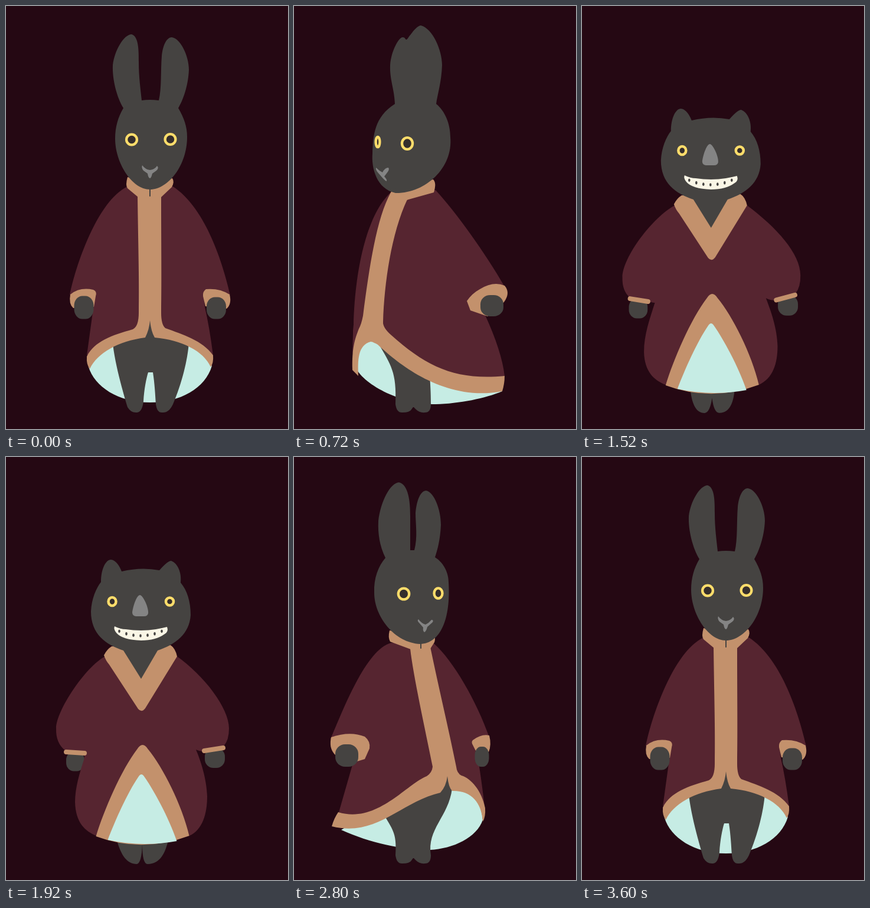
An HTML page with a canvas for the animation above (3680 ms loop, 478 px wide and 717 px high).

```html
<!DOCTYPE html>
<html lang="en">
<head>
<meta charset="utf-8">
<title>Turning dancers</title>
<style>
html, body { margin: 0; width: 478px; height: 717px; overflow: hidden; background: #250813; }
canvas { display: block; }
</style>
</head>
<body>
<canvas id="stage" width="478" height="717"></canvas>
<script>
const ctx = document.getElementById('stage').getContext('2d');
const LOOP = 3680, STEP = 80, TURN = 920;
const BG = '#250813', FUR = '#454341', COAT = '#562530', TRIM = '#c3916c', LINING = '#c6ece4',
      YELLOW = '#ffdd6b', PUPIL = '#352e2c', GREY = '#848484', TEETH = '#faf6e6';

// Poses hold path strings of equal structure; eyes and paws are "x,y rx ry".
const feet = '172,675 Q174,690 184,689 Q196,689 199,684 C200,682 201,681 202,680 L203,680 C204,681 205,682 207,684 Q213,690 222,689 Q232,689 232,675 ';

const front = {
  lining: 'M140,612 C150,645 190,672 244,672 C295,672 338,648 349,610 Q244,470 140,612Z',
  legs: 'M180,560 C182,600 200,660 206,680 Q212,690 222,689 Q231,688 233,670 C234,650 238,630 241,621 L249,621 C252,640 253,660 254,675 Q256,690 265,689 Q276,690 283,675 C298,640 308,600 310,570 L244,520Z',
  body: 'M206,306 C155,330 118,440 108,490 L150,490 L148,512 L137,592 Q180,560 225,545 L244,530 L263,545 Q310,560 351,592 Q345,545 337,510 L335,490 L380,490 C365,425 335,340 283,306Z',
  trim: 'M223,322 C224,400 226,460 225,520 Q225,543 215,548 C180,558 150,568 137,594 Q136,608 142,615 C155,588 190,568 236,562 Q243,548 244,533 Q246,552 252,562 C298,566 335,585 347,612 Q352,605 351,592 C333,567 300,557 270,546 Q263,540 263,520 C264,460 263,400 263,322Z',
  cuffL: 'M109,489 Q125,476 148,481 Q155,484 152,492 L149,510 L114,512 Q106,505 109,489Z',
  cuffR: 'M379,489 Q362,478 339,480 Q333,484 334,492 L338,509 L374,513 Q383,505 379,489Z',
  handL: '132,511 16.5 19.5',
  handR: '356.5,512 16.5 18.5',
  collar: 'M206,290 Q202,304 206,309 L224,324 L263,324 L281,307 Q286,298 282,292 L244,300Z',
  notch: 'M244,305 L244,322',
  head: 'M230,160 Q243,158 259,160 C264,140 262,110 264,85 C266,65 273,53 281,53 C296,55 310,85 310,108 C309,135 300,160 292,173 C302,190 307,205 307,222 C307,270 275,311 244,311 C213,311 185,265 185,225 C185,205 190,188 199,173 C188,155 180,125 181,100 C184,75 200,48 213,48 C225,52 225,75 225,95 C225,120 228,140 230,160Z',
  eyeL: '213,226.5 8.9 8.9',
  eyeR: '278.5,226 8.9 8.9',
  nose: 'M231,270 Q236,277 244,278 Q252,277 256,271 Q260,274 255,279 L248,284 Q246,292 244,292 Q241,291 240,284 L233,279 Q229,274 231,270Z'
};

const left = {
  lining: 'M104,612 C120,645 185,675 240,675 C280,674 325,665 353,653 Q100,480 104,612Z',
  legs: 'M142,570 C165,610 174,620 ' + feet + 'C232,655 231,640 230,625 L190,590Z',
  body: 'M164,316 C127,350 104,435 101,540 L100,550 L100,555 L99,590 Q108,555 118,530 L135,500 L150,545 Q230,650 357,627 Q352,585 324,524 L300,495 L356,474 C325,420 275,350 240,312Z',
  trim: 'M164,316 C140,360 128,440 117,525 Q114,540 110,547 C103,565 98,580 99,617 Q104,622 109,627 C108,600 108,575 130,569 Q133,569 136,571 Q139,572 142,574 C175,605 255,672 353,653 Q357,640 357,627 C275,635 225,612 165,558 Q150,545 151,535 C153,470 165,385 192,328Z',
  cuffL: 'M110,540 Q110,540 110,540 Q110,540 110,540 L110,540 L110,540 Q110,540 110,540Z',
  cuffR: 'M357,474 Q338,466 315,480 Q302,487 293,500 L299,516 L328,526 Q375,495 357,474Z',
  handL: '110,540 0 0',
  handR: '335.5,508 19.5 18',
  collar: 'M168,305 Q165,312 164,317 L175,335 L194,328 L237,316 Q242,300 236,294 L200,300Z',
  notch: 'M172,310 L172,314',
  head: 'M190,57 Q191,57 192,56 C196,50 199,47 201,44 C206,38 211,33 215,33 C235,38 251,75 251,100 C250,130 243,150 241,166 C256,178 265,200 265,222 C270,275 222,318 172,317 C140,310 131,275 133,250 C134,220 136,188 171,166 C170,140 162,125 163,100 C165,75 178,53 184,53 C187,53 188,54 188,55 C189,56 190,57 190,57Z',
  eyeL: '142,230.5 3.4 8.7',
  eyeR: '192,233 9 9.8',
  nose: 'M139,274 Q144,279 150,282 Q154,274 160,274 Q162,277 159,281 L153,289 Q158,294 157,297 Q154,296 148,289 L142,282 Q138,277 139,274Z'
};

const right = {
  lining: 'M80,632 C130,655 190,667 230,666 C270,664 310,645 320,615 Q310,500 80,632Z',
  legs: 'M152,605 C165,630 175,635 ' + feet + 'C225,630 262,610 268,562 L259,530Z',
  body: 'M165,315 C122,325 82,432 62,478 L120,485 L99,522 L76,602 Q150,640 236,540 L258,530 L276,535 Q310,555 323,592 Q318,550 314,525 L304,482 L331,475 C310,415 270,345 237,316Z',
  trim: 'M197,325 C202,370 222,460 235,525 Q234,535 225,541 C190,555 140,622 75,602 Q68,612 64,626 C140,645 180,585 248,569 Q258,558 260,541 Q262,560 268,566 C300,565 318,585 320,618 Q325,610 324,595 C318,565 300,545 284,540 Q276,536 275,525 C262,460 245,390 231,322Z',
  cuffL: 'M63,475 Q95,464 120,474 Q130,482 128,494 L120,512 L100,518 Q55,510 63,475Z',
  cuffR: 'M331,472 Q318,469 303,480 Q300,483 303,488 L309,500 L330,500 Q335,488 331,472Z',
  handL: '89.5,506 19.5 19',
  handR: '318.5,508 12 17',
  collar: 'M162,294 Q159,306 163,313 L198,326 L231,325 L238,314 Q240,308 238,303 L200,300Z',
  notch: 'M215,312 L215,324',
  head: 'M197,158 Q200,158 204,158 C210,135 206,115 206,95 C208,72 215,57 224,57 C238,60 249,90 249,115 C248,140 243,158 239,170 C255,180 262,198 262,212 C266,275 248,316 214,317 C170,315 136,270 136,230 C135,205 143,185 155,171 C145,150 142,130 143,108 C147,75 163,44 178,43 C194,47 197,75 197,100 C197,120 197,140 197,158Z',
  eyeL: '186,232 9.2 9.4',
  eyeR: '244.5,231 7 8.7',
  nose: 'M211,275 Q216,282 223,284 Q229,281 233,276 Q237,276 235,280 L226,288 Q224,296 221,297 Q218,295 219,289 L212,281 Q208,277 211,275Z'
};

// Arms out: the front pose shifted sideways, with its own legs and sleeves.
const shift = (s, dx) => s.replace(/[\d.]+(?=,)/g, x => +x + dx);
const open = Object.assign(
  Object.fromEntries(Object.entries(front).map(([k, s]) => [k, shift(s, -44)])), {
  legs: 'M136,560 C140,600 174,640 ' + feet + 'C232,640 262,600 266,570 L200,520Z',
  body: 'M163,306 C115,325 45,420 35,465 L85,490 L104,505 L93,592 Q136,560 181,545 L200,530 L219,545 Q266,560 307,592 Q301,545 296,505 L315,490 L365,465 C350,410 290,340 240,306Z',
  cuffL: 'M36,465 Q58,462 82,476 Q90,480 88,488 L75,506 L42,496 Q30,485 36,465Z',
  cuffR: 'M364,465 Q342,462 318,476 Q310,480 312,488 L325,506 L358,496 Q370,485 364,465Z',
  handL: '54,500 17 18',
  handR: '346,500 17 18'
});

const catFeet = 'M176,652 C170,670 170,690 182,690 Q193,690 201,680 Q210,690 220,689 C233,688 232,670 229,652Z';
const catOut = {
  x: '0', hem: '0', feet: catFeet,
  body: 'M137,338 C90,365 38,420 38,460 Q38,478 44,487 L73,499 Q95,500 106,490 C97,520 83,550 83,590 C84,620 100,635 122,643 Q200,672 280,642 C305,630 314,610 314,580 C314,550 302,520 293,494 Q300,499 314,499 L349,482 Q357,470 356,450 C356,410 320,385 261,338Z',
  cuffs: 'M44,489 L73,499 M317,499 L348,484',
  handL: '54.5,506 16.5 18', handR: '340,503 17 17.5'
};
const catDown = {
  x: '29', hem: '30.5',
  feet: 'M188,650 C195,675 205,690 222,690 Q230,688 231,656 Q231,690 240,690 C262,690 270,670 275,650Z',
  body: 'M168,338 C135,355 85,430 85,460 Q84,485 101,498 L134,500 Q132,505 133,510 C125,535 117,560 117,585 C118,620 134,634 153,642 Q230,672 311,642 C333,632 341,605 341,575 C340,545 330,515 322,496 Q328,499 336,499 L369,490 Q378,480 378,460 C378,425 335,370 290,338Z',
  cuffs: 'M102,500 L133,502 M336,498 L368,493',
  handL: '117.5,516 15.5 16.5', handR: '354,510 17 17'
};
const catUp = {
  x: '-2.5', hem: '-1', feet: shift(catFeet, -1),
  body: 'M136,338 C90,362 34,420 34,462 Q35,476 41,484 L71,498 Q90,501 104,493 C98,520 85,555 85,590 C86,620 100,632 122,641 Q200,670 277,640 C302,630 310,600 310,575 C309,545 293,505 283,471 Q290,487 330,488 L369,466 Q371,458 370,445 C365,405 340,395 258,338Z',
  cuffs: 'M42,485 L70,497 M335,488 L368,469',
  handL: '51,502 16 18', handR: '360,489 17.5 16'
};

const rabbitKeys = [[-880, right], [-600, open], [-160, front], [0, front], [400, open], [560, open], [720, left]];
const catKeys = [[1040, catUp], [1280, catOut], [1680, catDown], [1920, catDown], [2320, catUp]];

function mix(a, b, k) {
  const to = b.match(/-?[\d.]+/g);
  let i = 0;
  return a.replace(/-?[\d.]+/g, v => (+v + (to[i++] - v) * k).toFixed(2));
}

function poseAt(keys, t) {
  if (t <= keys[0][0]) return keys[0][1];
  const i = keys.findIndex(([time]) => time >= t);
  if (i < 0) return keys[keys.length - 1][1];
  const [t0, a] = keys[i - 1], [t1, b] = keys[i];
  const u = (t - t0) / (t1 - t0), k = u * u * (3 - 2 * u);
  return Object.fromEntries(Object.keys(a).map(n => [n, mix(a[n], b[n], k)]));
}

function fill(path, color) {
  ctx.fillStyle = color;
  ctx.fill(new Path2D(path));
}

function line(path, color, width) {
  ctx.strokeStyle = color;
  ctx.lineWidth = width;
  ctx.lineCap = 'round';
  ctx.stroke(new Path2D(path));
}

const numbers = spec => spec.split(/[ ,]/).map(Number);

function oval(spec, color, ring) {
  const [x, y, rx, ry] = numbers(spec);
  ctx.beginPath();
  ctx.ellipse(x, y, rx, ry, 0, 0, 7);
  ctx.fillStyle = color;
  ctx.fill();
  if (!ring) return;
  ctx.strokeStyle = YELLOW;
  ctx.lineWidth = ring;
  ctx.stroke();
}

function paw(spec) {
  const [x, y, rx, ry] = numbers(spec);
  ctx.beginPath();
  ctx.roundRect(x - rx, y - ry, 2 * rx, 2 * ry, { x: rx * 0.85, y: ry * 0.85 });
  ctx.fillStyle = FUR;
  ctx.fill();
}

function shifted(dx, draw) {
  ctx.save();
  ctx.translate(+dx, 0);
  draw();
  ctx.restore();
}

function drawRabbit(p) {
  fill(p.lining, LINING);
  fill(p.legs, FUR);
  fill(p.body, COAT);
  fill(p.trim, TRIM);
  fill(p.cuffL, TRIM);
  fill(p.cuffR, TRIM);
  paw(p.handL);
  paw(p.handR);
  fill(p.collar, TRIM);
  fill(p.head, FUR);
  line(p.notch, FUR, 2);
  oval(p.eyeL, PUPIL, 4.3);
  oval(p.eyeR, PUPIL, 4.3);
  fill(p.nose, GREY);
}

function drawCat(p) {
  fill(p.feet, FUR);
  paw(p.handL);
  paw(p.handR);
  fill(p.body, COAT);
  line(p.cuffs, TRIM, 8);
  shifted(p.hem, () => {
    fill('M122,643 C135,600 165,530 192,495 Q201,481 210,495 C235,525 268,590 280,642 Q200,672 122,643Z', TRIM);
    fill('M142,649 C155,615 175,570 194,542 Q199,534 204,542 C220,565 245,610 259,651 Q200,662 142,649Z', LINING);
  });
  shifted(p.x, () => {
    fill('M150,321 Q142,326 137,336 Q140,345 146,352 L195,427 Q201,434 207,426 L261,338 Q258,324 250,319Z', TRIM);
    fill('M167,194 Q200,186 231,192 Q245,176 251,176 C262,180 269,196 267,213 C278,226 284,245 284,268 C282,300 258,318 228,328 L200,376 L170,328 C140,318 115,300 115,262 C116,240 124,222 132,212 C132,190 140,174 149,174 C158,175 164,186 167,194Z', FUR);
    oval('151,245 6.5 7', PUPIL, 4.5);
    oval('248.5,245 6.5 6.5', PUPIL, 4.5);
    fill('M198,234 C203,234 213,255 212,265 Q211,270 205,270 L191,270 Q185,269 185,263 C187,250 193,234 198,234Z', GREY);
    fill('M155,287 Q165,292 174,292 Q200,296 225,292 Q236,290 244,288 Q247,296 240,300 Q225,311 200,311 Q168,310 158,298 Q153,292 155,287Z', TEETH);
    for (let i = -3; i <= 3; i++) oval(`${199 + i * 12},${303 - i * i * 0.85} 1.8 2.8`, FUR);
  });
}

function frame(now) {
  const t = Math.floor(now % LOOP / STEP) * STEP;
  ctx.fillStyle = BG;
  ctx.fillRect(0, 0, 478, 717);
  if (t > TURN && t < LOOP - TURN) drawCat(poseAt(catKeys, t));
  else drawRabbit(poseAt(rabbitKeys, t > LOOP / 2 ? t - LOOP : t));
  requestAnimationFrame(() => frame(performance.now() - start));
}
const start = performance.now();
frame(0);
</script>
</body>
</html>
```
